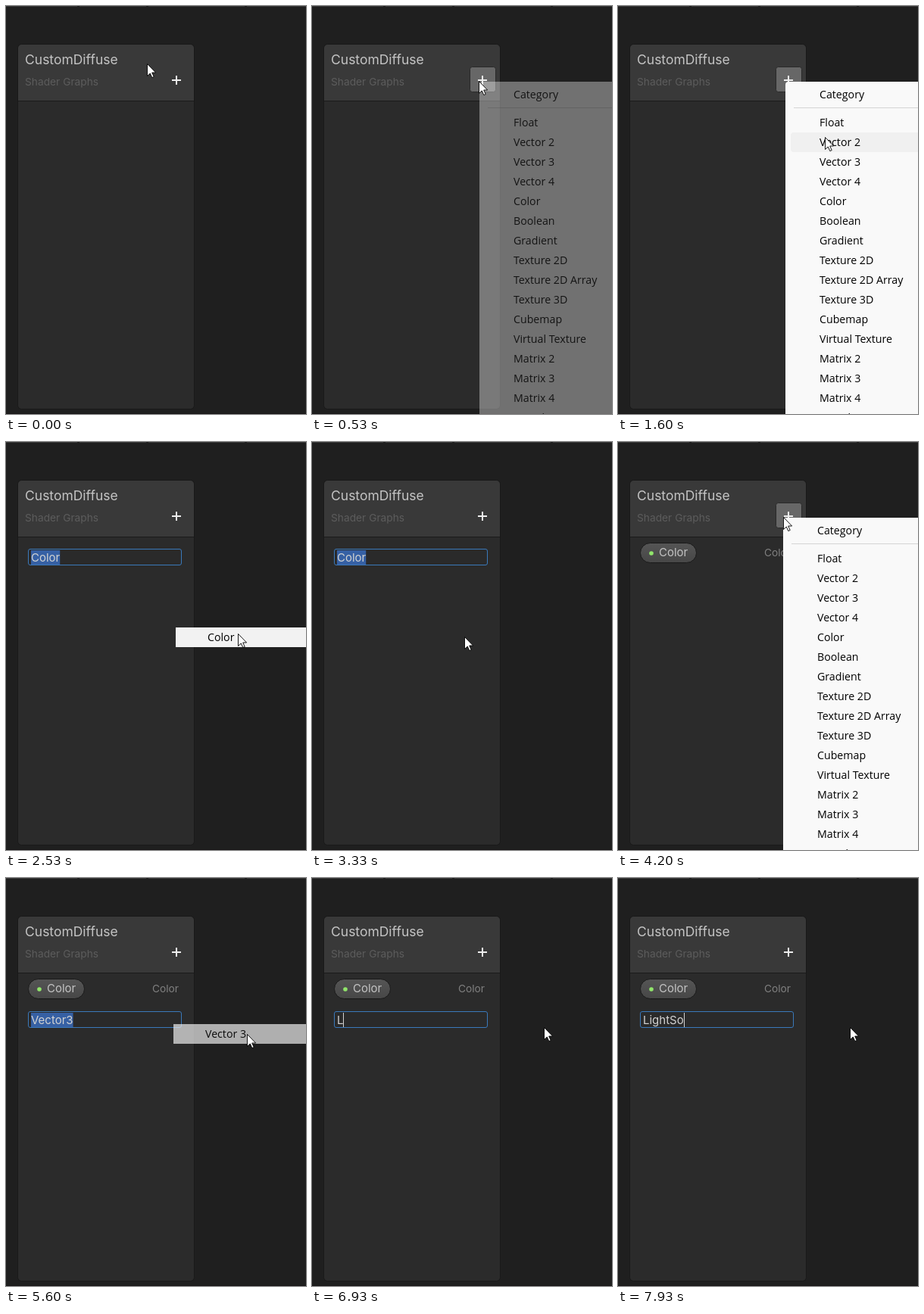
An HTML page for the animation above (8000 ms loop, 396x539 px).

```html
<!DOCTYPE html>
<html lang="en">
<head>
<meta charset="utf-8">
<title>Shader graph blackboard</title>
<style>
  html, body { margin: 0; width: 100%; height: 100%; overflow: hidden; background: #1f1f1f; }
  svg { display: block; width: 396px; height: 539px; }
  text { font: 15px Inter, sans-serif; fill: #c4c4c4; white-space: pre; }
  .title { font-size: 17.5px; }
  .small { font-size: 13.75px; }
  .menu text { font: 14.2px "Open Sans", sans-serif; fill: #000; }
</style>
</head>
<body>
<svg viewBox="0 0 396 539">
  <defs>
    <linearGradient id="pillFill" x2="0" y2="1">
      <stop stop-color="#555"/><stop offset="1" stop-color="#474747"/>
    </linearGradient>
  </defs>
  <rect width="396" height="539" fill="#1f1f1f"/>
  <path d="M0 .5H94M97 .5H185M188 .5H315M318 .5H396" stroke="#3a3a3a"/>
  <path d="M0 538.5H396" stroke="#191617"/>

  <rect x="15.5" y="50.5" width="233" height="482" rx="5" fill="#2b2b2b" stroke="#191919"/>
  <path d="M16 125V56a5 5 0 0 1 5-5H243a5 5 0 0 1 5 5V125Z" fill="#393939"/>
  <path d="M16 125.5H248" stroke="#1b1b1b"/>
  <text class="title" x="25" y="77">CustomDiffuse</text>
  <text class="small" x="25" y="105" style="fill:#5c5c5c">Shader Graphs</text>
  <rect id="button" x="208.5" y="80.5" width="34" height="33" rx="3" fill="#676767" stroke="#2a2a2a"/>
  <path d="M219 98H231M225 92V104" stroke="#eee" stroke-width="2"/>

  <g id="pill">
    <rect x="29.5" y="133.5" width="74" height="26" rx="13" fill="url(#pillFill)" stroke="#191919"/>
    <circle cx="44" cy="147" r="2.8" fill="#91e66b"/>
    <text x="54" y="151">Color</text>
    <text class="small" x="193" y="151" style="fill:#808080">Color</text>
  </g>

  <g id="field">
    <rect x="29.5" y="141.5" width="202" height="21" rx="2.5" fill="#2a2a2a" stroke="#3a79bb"/>
    <rect id="selection" x="33" y="143" height="19" fill="#3660a4"/>
    <text id="fieldText" x="33" y="158" style="fill:#d2d2d2"></text>
    <rect id="caret" y="143" width="1" height="19" fill="#d2d2d2"/>
  </g>

  <g id="menu" class="menu">
    <path d="M0 539V104a4 4 0 0 1 4-4H200V539Z" fill="#f9f9f9"/>
    <path d="M11 134.5H200" stroke="#d5d5d5"/>
    <rect id="hover" x="7" width="190" height="26" rx="4" fill="#f0f0f0"/>
  </g>
  <g id="flash" class="menu">
    <rect x="3" y="-13" width="200" height="26" fill="#f4f4f4"/>
    <text id="flashText" x="45" y="5"></text>
  </g>
  <path id="cursor" d="M.5 .5V16.5L4.3 13L6.8 18.6L9.2 17.5L6.7 12H11.6Z" fill="#fff" stroke="#000" stroke-width=".9"/>
</svg>
<script>
const LOOP = 8000, FRAME = 200 / 3;
const $ = id => document.getElementById(id);
const set = (id, attrs) => { for (const k in attrs) $(id).setAttribute(k, attrs[k]); };
const show = (id, on) => set(id, { visibility: on ? 'visible' : 'hidden' });
const clamp = v => Math.max(0, Math.min(1, v));

const items = ['Category', 'Float', 'Vector 2', 'Vector 3', 'Vector 4', 'Color', 'Boolean', 'Gradient',
  'Texture 2D', 'Texture 2D Array', 'Texture 3D', 'Cubemap', 'Virtual Texture',
  'Matrix 2', 'Matrix 3', 'Matrix 4', 'Sampler State'];
const rowCenter = i => i ? 128 + 26 * i : 117;
items.forEach((label, i) => {
  const text = document.createElementNS('http://www.w3.org/2000/svg', 'text');
  text.textContent = label;
  text.setAttribute('x', 45);
  text.setAttribute('y', rowCenter(i) + 5);
  $('menu').append(text);
});

const menus = [
  { open: 462, close: 2530, x: 221, pick: 5 },
  { open: 4005, close: 5465, x: 218, pick: 3 }
];
const fields = [
  { from: 2530, to: 3395, y: 0, name: 'Color' },
  { from: 5465, to: LOOP, y: 35, name: 'Vector3' }
];
const typed = 'LightSo', keyTimes = [6930, 7130, 7265, 7330, 7465, 7730, 7930];

// Pointer path: time, x, y
const path = [[0, 186, 76], [330, 220, 99], [930, 220, 99], [1600, 273, 173], [1800, 289, 214],
  [1930, 306, 277], [2000, 306, 277], [2200, 306, 253], [2530, 306, 253], [3330, 201, 257],
  [3930, 218, 99], [4330, 218, 99], [5000, 318, 204], [5400, 318, 204], [5600, 318, 206],
  [5930, 306, 197], [LOOP, 306, 197]];

// Monotone cubic interpolation along the path
const slope = (i, c) => (path[i + 1][c] - path[i][c]) / (path[i + 1][0] - path[i][0]);
function tangent(i, c) {
  if (!i || i === path.length - 1) return 0;
  const a = slope(i - 1, c), b = slope(i, c);
  return a * b <= 0 ? 0 : 2 * a * b / (a + b);
}
function pointer(t, c) {
  let i = 0;
  while (i < path.length - 2 && t >= path[i + 1][0]) i++;
  const p = path[i], q = path[i + 1], h = q[0] - p[0], u = clamp((t - p[0]) / h), s = u * u * (3 - 2 * u);
  return p[c] + (q[c] - p[c]) * s
    + h * u * (1 - u) * ((1 - u) * tangent(i, c) - u * tangent(i + 1, c));
}

function drawMenu(t, x, y) {
  const menu = menus.find(m => t >= m.open && t < m.close);
  show('menu', menu);
  show('hover', false);
  if (menu) {
    set('menu', { transform: `translate(${menu.x})`, opacity: clamp((t - menu.open) / 190) });
    const row = items.findIndex((_, i) => Math.abs(y - rowCenter(i)) < 13);
    if (row >= 0 && x > menu.x + 7) {
      show('hover', true);
      set('hover', { y: rowCenter(row) - 13 });
    }
  }
  const overButton = x >= 209 && x <= 243 && y >= 80 && y <= 114;
  show('button', menu || overButton);

  const closed = menus.find(m => t >= m.close && t < m.close + 420);
  show('flash', closed);
  if (closed) {
    set('flash', {
      transform: `translate(${closed.x} ${rowCenter(closed.pick)})`,
      opacity: 1 - (t - closed.close) / 420
    });
    $('flashText').textContent = items[closed.pick];
  }
}

function drawField(t) {
  const field = fields.find(f => t >= f.from && t < f.to);
  show('field', field);
  show('selection', false);
  show('caret', false);
  if (!field) return;
  const count = keyTimes.filter(k => t >= k).length;
  $('fieldText').textContent = count ? typed.slice(0, count) : field.name;
  const width = $('fieldText').getComputedTextLength();
  set('field', { transform: `translate(0 ${field.y})` });
  set('selection', { width });
  set('caret', { x: Math.round(33 + width) });
  show(count ? 'caret' : 'selection', true);
}

function draw(now) {
  const t = Math.floor((now % LOOP + 4) / FRAME) * FRAME;
  const x = Math.round(pointer(t, 1)), y = Math.round(pointer(t, 2));
  set('cursor', { transform: `translate(${x} ${y})` });
  show('pill', t >= 3395);
  drawMenu(t, x, y);
  drawField(t);
}

const start = performance.now();
function tick() {
  draw(performance.now() - start);
  requestAnimationFrame(tick);
}
tick();
</script>
</body>
</html>
```
